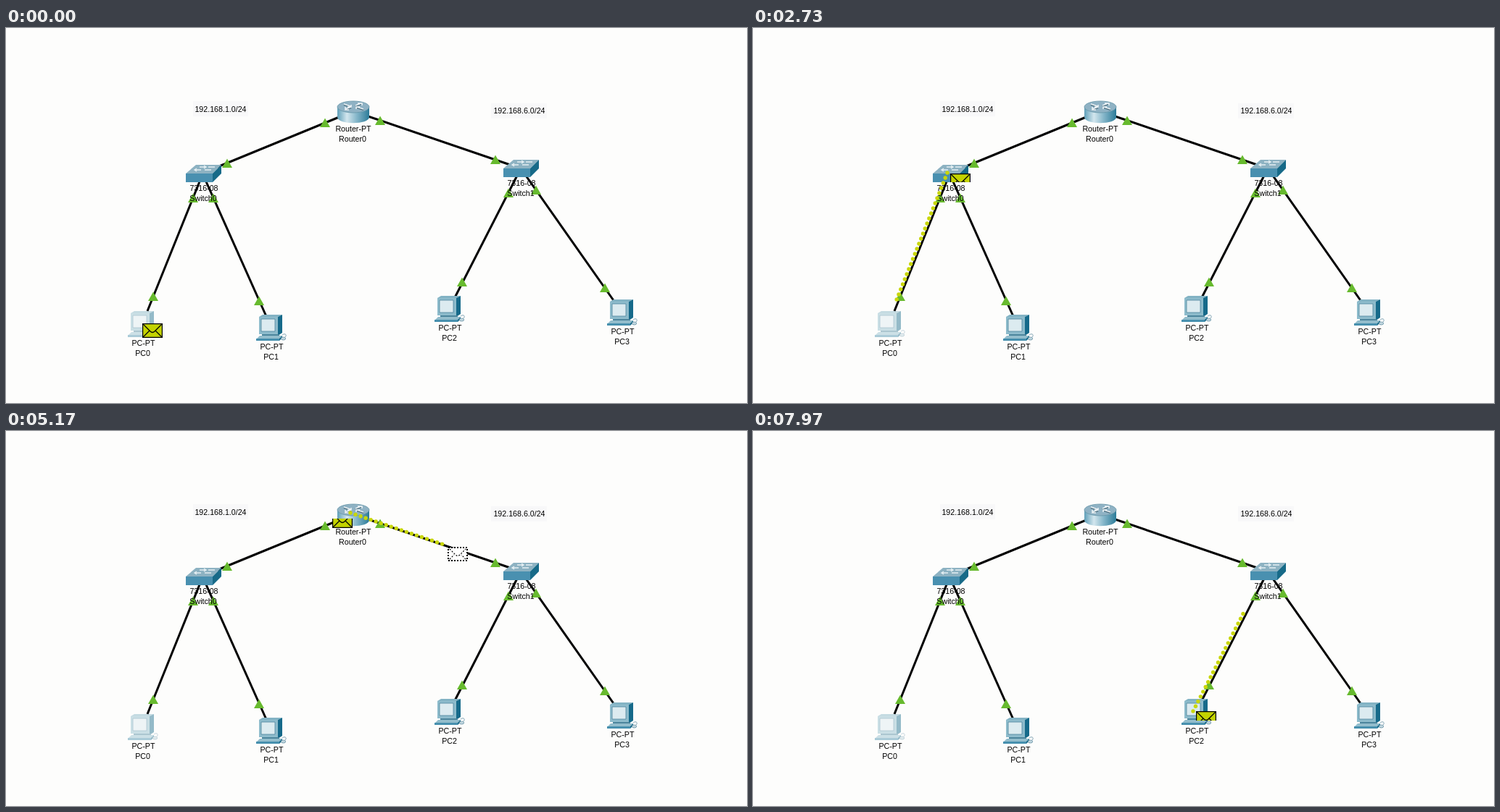
These frames come from a looping animation (1022 by 518 pixels, 8000 ms). An HTML page:

```html
<!DOCTYPE html>
<html lang="en">
<head>
<meta charset="utf-8">
<title>Packet walk</title>
<style>
  html, body { margin: 0; width: 100%; height: 100%; overflow: hidden; background: #fdfdfc; }
  svg { display: block; width: 1022px; height: 518px; }
  text { font: 10.67px "Liberation Sans", Arial, sans-serif; text-anchor: middle; fill: #000; }
</style>
</head>
<body>
<svg id="stage" viewBox="0 0 1022 518">
  <defs>
    <linearGradient id="drum">
      <stop offset="0" stop-color="#5f9fb8"/>
      <stop offset=".3" stop-color="#d3e6ee"/>
      <stop offset=".6" stop-color="#86b7ca"/>
      <stop offset="1" stop-color="#2c7b98"/>
    </linearGradient>
    <g id="pc">
      <path fill="#83b3c4" d="M4 3 9 0H36L30 3Z"/>
      <path fill="#8dbbcb" d="M4 3H30V27H4Z"/>
      <path fill="#dcebf0" stroke="#4c859c" stroke-width=".8" d="M7 6H26V23H7Z"/>
      <path fill="#166a8a" d="M30 3 36 0V25L30 29Z"/>
      <path fill="#4c859c" d="M8 27H32V30H8Z"/>
      <path fill="#93bdcc" d="M5 29H36L32 34H0Z"/>
      <path fill="#4790ae" d="M0 33H32V36H0Z"/>
      <path fill="#166a8a" d="M32 33 36 29V32L32 36Z"/>
      <path fill="none" stroke="#648fa2" stroke-width=".8" d="M36 28C40 25 43 28 40 31"/>
      <ellipse cx="37.5" cy="33" rx="3.2" ry="2" fill="#c3d8e0" stroke="#648fa2" stroke-width=".8"/>
    </g>
    <g id="switch">
      <path fill="#8db2c2" d="M0 12 14 0H49L37 12Z"/>
      <path fill="#4990b0" d="M0 12H37V24H0Z"/>
      <path fill="#176a88" d="M37 12 49 0V12L37 24Z"/>
      <path fill="none" stroke="#e4eef2" stroke-width="1.4" d="M19 3H27M31 3H40M13 7H21M26 7H35M25 1 28 3 25 5M15 5 12 7 15 9"/>
    </g>
    <g id="router">
      <path fill="url(#drum)" d="M0 8V22C0 33 44 33 44 22V8Z"/>
      <ellipse cx="22" cy="8" rx="22" ry="8" fill="#8fb2c4" stroke="#6495a8" stroke-width=".8"/>
      <path fill="none" stroke="#496c7c" stroke-width="2" d="M9 5 18 8M27 9 36 12M25 7 33 4M11 12 19 9"/>
      <path fill="none" stroke="#edf3f6" stroke-width="1.5" d="M9 4 18 7M14 8H19V5M27 8 36 11M26 11V8H31M25 6 33 3M28 3H34V6M11 11 19 8M11 8V12H16"/>
    </g>
    <g id="solid">
      <path fill="#c3d300" stroke="#000" stroke-width="1.2" d="M.6 .6H27.4V19.4H.6Z"/>
      <path fill="none" stroke="#000" stroke-width="1.2" d="M1 1 11 11Q14 14 17 11L27 1M1 19 10 10M27 19 18 10"/>
    </g>
    <g id="ghost" fill="#fff" stroke="#000" stroke-dasharray="2 2">
      <path stroke-width="2" d="M1 1H27V19H1Z"/>
      <path fill="none" stroke-width="1.2" d="M3 3 11 11Q14 14 17 11L25 3M3 17 9 11M25 17 19 11"/>
    </g>
    <clipPath id="visible"><rect id="visibleRect" width="28"/></clipPath>
  </defs>
  <rect width="1022" height="518" fill="#fdfdfc"/>
  <g fill="#f8f8f9"><path d="M258 101H334V122H258ZM669 104H746V125H669Z"/></g>
  <g id="links" stroke="#000" stroke-width="3"></g>
  <g id="devices"></g>
  <g id="lights" fill="#67ba2e"></g>
  <g id="labels"></g>
  <g id="trail" fill="#c8d60a"></g>
  <g clip-path="url(#visible)"><use id="packet" href="#solid"/></g>
  <use id="moving" href="#ghost"/>
</svg>
<script>
const LOOP = 8000;
const $ = id => document.getElementById(id);

function add(parent, tag, attrs, text) {
  const el = document.createElementNS("http://www.w3.org/2000/svg", tag);
  for (const key in attrs) el.setAttribute(key, attrs[key]);
  if (text) el.textContent = text;
  $(parent).append(el);
  return el;
}

const move = (el, x, y) => el.setAttribute("transform", `translate(${x} ${y})`);
const show = (el, on) => el.setAttribute("visibility", on ? "visible" : "hidden");
const mix = (a, b, f) => a.map((v, i) => v + (b[i] - v) * f);

// Linear interpolation through [time, value] points, held at both ends.
function track(points, t) {
  if (t <= points[0][0]) return points[0][1];
  for (let i = 1; i < points.length; i++) {
    const [t0, v0] = points[i - 1], [t1, v1] = points[i];
    if (t < t1) return v0 + (v1 - v0) * (t - t0) / (t1 - t0);
  }
  return points.at(-1)[1];
}

function label(x, y, kind, name) {
  add("labels", "text", { x, y }, kind);
  if (name) add("labels", "text", { x: x - 1, y: y + 14 }, name);
}

function device(icon, x, y, opacity = 1) {
  add("devices", "use", { href: "#" + icon, x, y, opacity });
}

[[479, 115, 272, 200], [479, 115, 710, 194], [271.5, 201, 195, 391],
 [271, 201, 366, 414], [710, 194, 611, 388], [710, 194, 849, 392]]
  .forEach(([x1, y1, x2, y2]) => add("links", "line", { x1, y1, x2, y2 }));

[[440, 131], [516, 128], [305, 187], [675, 182], [258, 235], [286, 235],
 [203, 371], [349, 377], [693, 228], [731, 224], [629, 351], [826, 359]]
  .forEach(([x, y]) => add("lights", "path", { d: `M${x} ${y - 6.5}l7 12.5h-14z` }));

device("router", 457, 101);
label(479, 143, "Router-PT", "Router0");
[[248, 189], [686, 182]].forEach(([x, y], i) => {
  device("switch", x, y);
  label(x + 25, y + 36, "7316-08", "Switch" + i);
});
[[168, 391], [345, 396], [591, 370], [829, 375]].forEach(([x, y], i) => {
  device("pc", x, y, i ? 1 : 0.45);
  label(x + 21.5, y + 48, "PC-PT", "PC" + i);
});
label(296, 116, "192.168.1.0/24");
label(708, 118, "192.168.6.0/24");

// Per stop: envelope corner, trail point, visible rows when waiting and when sending.
const stops = [
  { at: [188, 408], dot: [187, 403], wait: [0, 20], send: [3, 20] },
  { at: [272, 201], dot: [268, 200], wait: [0, 12], send: [10, 20] },
  { at: [478, 114], dot: [475, 113], wait: [0, 20], send: [7, 21] },
  { at: [710, 195], dot: [707, 192], wait: [0, 20], send: [0, 20] },
  { at: [611, 387], dot: [607, 387], wait: [0, 13] }
];

const hops = [
  { leave: 1100, arrive: 2510, head: [[1180, 0], [2303, 1]], tail: [[2595, 0], [2730, .13], [2769, .17], [2770, .57], [3200, 1.01]] },
  { leave: 2800, arrive: 4193, head: [[2863, 0], [3915, 1]], tail: [[4100, 0], [4470, .08], [5100, 1.01]] },
  { leave: 4520, arrive: 5960, head: [[4632, 0], [5584, 1]], tail: [[5560, 0], [6540, 1.01]] },
  { leave: 6155, arrive: 7485, head: [[6155, 0], [7405, 1]], tail: [[7660, 0], [7970, .3], [8700, 1.01]] }
];

hops.forEach((hop, i) => {
  const a = stops[i].dot, b = stops[i + 1].dot;
  const count = Math.round(Math.hypot(b[0] - a[0], b[1] - a[1]) / 7.5);
  hop.dots = Array.from({ length: count + 1 }, (_, k) => {
    const [cx, cy] = mix(a, b, k / count);
    return { f: k / count, el: add("trail", "circle", { cx, cy, r: 2.7 }) };
  });
});

function render(t) {
  let stop = 0, sending = false, ghostAt = null;
  hops.forEach((hop, i) => {
    const head = track(hop.head, t), tail = track(hop.tail, t);
    for (const { f, el } of hop.dots) show(el, t > hop.head[0][0] && f <= head && f >= tail);
    if (t >= hop.arrive) {
      stop = i + 1;
    } else if (t >= hop.leave) {
      sending = true;
      ghostAt = mix(stops[i].at, stops[i + 1].at, head);
    }
  });

  const { at: [x, y], wait, send } = stops[stop];
  const [top, bottom] = sending ? send : wait;
  const left = sending ? x - 28 : x;
  move($("packet"), left, y);
  $("visibleRect").setAttribute("x", left);
  $("visibleRect").setAttribute("y", y + top);
  $("visibleRect").setAttribute("height", bottom - top);

  show($("moving"), ghostAt);
  if (ghostAt) move($("moving"), ...ghostAt.map(Math.round));
}

const start = performance.now();
function tick() {
  render((performance.now() - start) % LOOP);
  requestAnimationFrame(tick);
}
tick();
</script>
</body>
</html>
```
